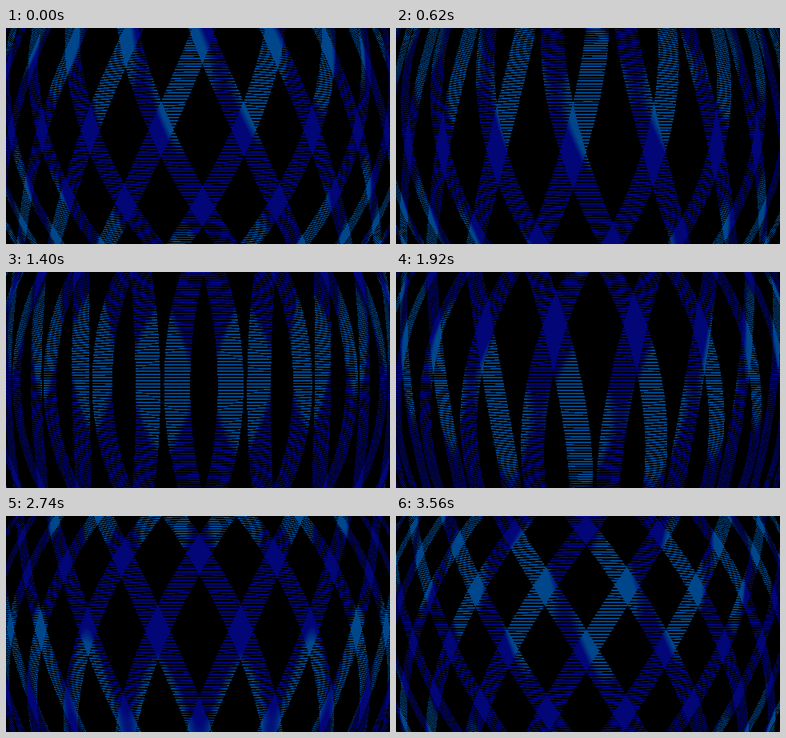
Animation, 480 px wide and 270 px high, one loop 3580 ms. Source, as an HTML page with a canvas:

```html
<!DOCTYPE html>
<html>
<head>
<meta charset="utf-8">
<style>
html, body { margin: 0; width: 100%; height: 100%; overflow: hidden; background: #000; }
canvas { display: block; width: 480px; height: 270px; }
</style>
</head>
<body>
<canvas width="480" height="270"></canvas>
<script>
const W = 480, H = 270, LOOP = 3580, STEP = 20;
const LENS = 232.7, BEND = 0.455;
const SWING = 5.64, TWIST = 0.235, HALF_WIDTH = 0.157, LINE = 0.0378;
const BAND = 280;
const DARK = [2, 6, 118], LIGHT = [0, 70, 138];

const ctx = document.querySelector('canvas').getContext('2d');
const image = ctx.createImageData(W, H);
const pixels = new Uint32Array(image.data.buffer);
const flatX = new Float32Array(W * H), flatY = new Float32Array(W * H);

// Undo the fisheye once: every pixel gets its place on the flat weave.
for (let i = 0; i < W * H; i++) {
  const dx = i % W + 0.5 - W / 2, dy = Math.floor(i / W) + 0.5 - H / 2;
  const r = Math.hypot(dx, dy);
  const scale = Math.tan(r / LENS) / BEND / r;
  flatX[i] = dx * scale;
  flatY[i] = dy * scale;
}

// Shades from dark to light blue, packed as ABGR
const shades = Array.from({ length: 17 }, (_, i) => {
  const [r, g, b] = DARK.map((c, k) => Math.round(c + (LIGHT[k] - c) * i / 16));
  return (255 << 24 | b << 16 | g << 8 | r) >>> 0;
});
const BLACK = 0xff000000;

const wrap = v => v - Math.round(v);
const clamp = v => Math.max(0, Math.min(1, v));

// Light falls in columns that drift slower than the weave and in bands that sink.
function lightAt(i, column, band) {
  const side = (i % W - W / 2) / 190;
  const y = Math.floor(i / W) + 70 * side * side;
  return Math.cos(2 * Math.PI * (flatX[i] - column))
    + 1.25 * Math.cos(2 * Math.PI * (y - band) / BAND) - 0.4;
}

function draw(t) {
  const angle = 2 * Math.PI * t / (3 * LOOP) - 0.8;
  const drift = 0.555 + 0.00283 * t + 2.75e-8 * t * t;
  const column = -0.2 + 0.00045 * t + 6.5e-8 * t * t;
  const band = 60 + 0.033 * t + 1.7e-5 * t * t;
  for (let i = 0; i < W * H; i++) {
    const x = flatX[i] - drift, v = flatY[i];
    const gap = SWING * Math.cos(angle - TWIST * v);
    const onA = Math.abs(wrap(x - gap / 2)) < HALF_WIDTH;
    const onB = Math.abs(wrap(x + gap / 2)) < HALF_WIDTH;
    const inLine = v / LINE - Math.floor(v / LINE) < 0.5;
    const lit = onA && onB || (onA || onB) && inLine;
    pixels[i] = lit
      ? shades[Math.round(16 * clamp(lightAt(i, column, band) / 0.5 + 0.5))]
      : BLACK;
  }
  ctx.putImageData(image, 0, 0);
}

let shown = -1;
function tick() {
  const t = Math.floor(performance.now() % LOOP / STEP) * STEP;
  if (t !== shown) draw(shown = t);
  requestAnimationFrame(tick);
}
tick();
</script>
</body>
</html>
```
